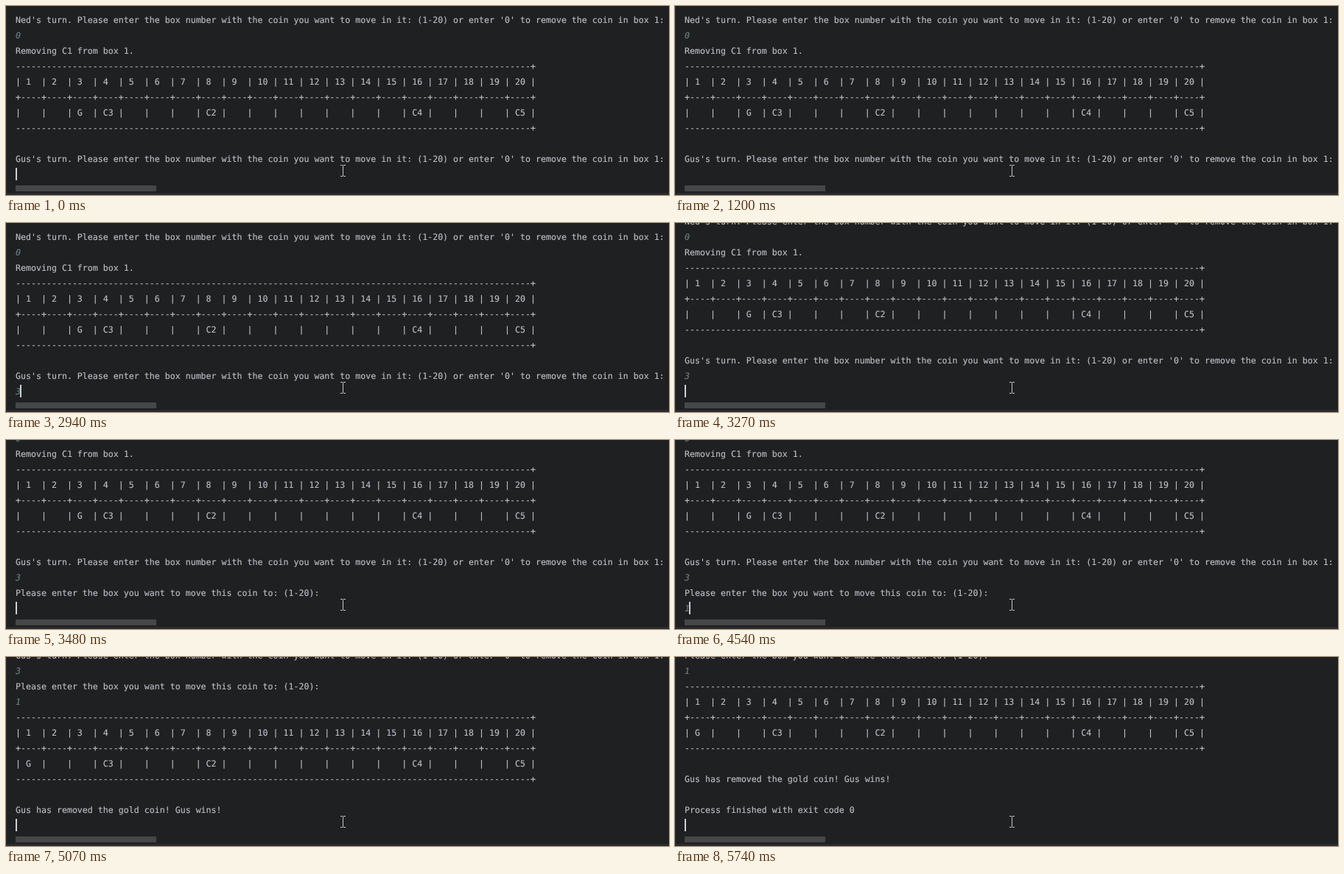
These frames come from a looping animation (900x257 px, 6270 ms). An HTML page:

```html
<!DOCTYPE html>
<html lang="en">
<head>
<meta charset="utf-8">
<title>Coin game console</title>
<style>
html, body { margin: 0; width: 100%; height: 100%; overflow: hidden; background: #1e2022; }
svg { display: block; }
text {
  font: 11.627px "DejaVu Sans Mono", "Noto Sans Mono", monospace;
  fill: #bcbec4;
  stroke: #bcbec4;
  stroke-width: .15px;
  white-space: pre;
  text-rendering: geometricPrecision;
  font-variant-ligatures: none;
}
text.input { font-style: italic; fill: #6c7f84; stroke: #6c7f84; }
</style>
</head>
<body>
<svg width="900" height="257" viewBox="0 0 900 257">
  <defs><clipPath id="view"><rect width="900" height="253"/></clipPath></defs>
  <rect width="900" height="257" fill="#1e2022"/>
  <g clip-path="url(#view)"><g id="lines"></g></g>
  <rect id="caret" y="220" width="2" height="17" fill="#ced0d6"/>
  <rect x="13" y="244" width="191" height="8" fill="#8a8a8a" fill-opacity=".37"/>
  <rect width="1" height="257" fill="#2b2d30"/>
  <rect y="254" width="900" height="3" fill="#2a292c"/>
  <path d="M454 216.5h3M458 216.5h3M457.5 217v14M454 231.5h3M458 231.5h3" fill="none" stroke="#c4c4c4"/>
</svg>
<script>
const LOOP = 6270, ROW = 21, LEFT = 13, BASE = 23, CARET_ROW = 10;
const FIRST = "Ned", SECOND = "Gus";

const ask = name => `${name}'s turn. Please enter the box number with the coin you want ` +
  "to move in it: (1-20) or enter '0' to remove the coin in box 1:";
const cells = value => "|" +
  Array.from({ length: 20 }, (_, i) => " " + String(value(i + 1)).padEnd(3) + "|").join("");
const board = coins => {
  const edge = "-".repeat(100) + "+";
  return [edge, cells(n => n), "+" + "----+".repeat(20), cells(n => coins[n] || ""), edge];
};

const rest = { 4: "C3", 8: "C2", 16: "C4", 20: "C5" };
const log = [
  ask(FIRST), "0", "Removing C1 from box 1.",
  ...board({ 3: "G", ...rest }), "",
  ask(SECOND), "3", "Please enter the box you want to move this coin to: (1-20):", "1",
  ...board({ 1: "G", ...rest }), "",
  `${SECOND} has removed the gold coin! ${SECOND} wins!`, "",
  "Process finished with exit code 0"
];
const after = text => log.findIndex(line => line.startsWith(text)) + 1;

// "row" is the caret's line; "ahead" counts lines already visible from there on
const question = after(SECOND), prompt = after("Please");
const events = [
  { at: 0, row: question },
  { at: 2940, row: question, typing: true, ahead: 1 },
  { at: 3270, row: question + 1 },
  { at: 3480, row: prompt },
  { at: 4540, row: prompt, typing: true, ahead: 1 },
  { at: 5010, row: prompt + 1, flushing: true, ahead: 2 },
  { at: 5070, row: after(`${SECOND} has`) },
  { at: 5740, row: log.length }
];

const BLINK = 1005, DARK = 540, FIRST_DARK = 190, HOLD = 790;

// The caret blinks steadily but stays lit for a while after any activity.
function caretLit(time, event) {
  if (event.flushing) return false;
  if (event.at > 0 && time - event.at < HOLD) return true;
  return time < FIRST_DARK || (time - FIRST_DARK) % BLINK >= DARK;
}

const group = document.getElementById("lines");
const caret = document.getElementById("caret");
const show = (el, on) => el.setAttribute("visibility", on ? "visible" : "hidden");

const rows = log.map((line, i) => {
  const el = document.createElementNS("http://www.w3.org/2000/svg", "text");
  el.setAttribute("x", LEFT);
  el.setAttribute("y", BASE + i * ROW);
  if (/^\d$/.test(line)) el.setAttribute("class", "input");
  el.textContent = line;
  return group.appendChild(el);
});

function draw(time) {
  const event = events.findLast(e => e.at <= time);
  const { row, ahead = 0, typing } = event;
  group.setAttribute("transform", `translate(0 ${(CARET_ROW - row) * ROW})`);
  rows.forEach((el, i) => show(el, i < row + ahead));
  caret.setAttribute("x", typing ? LEFT + 6 : LEFT);
  show(caret, caretLit(time, event));
}

const start = performance.now();
function tick() {
  draw((performance.now() - start) % LOOP);
  requestAnimationFrame(tick);
}
tick();
</script>
</body>
</html>
```
